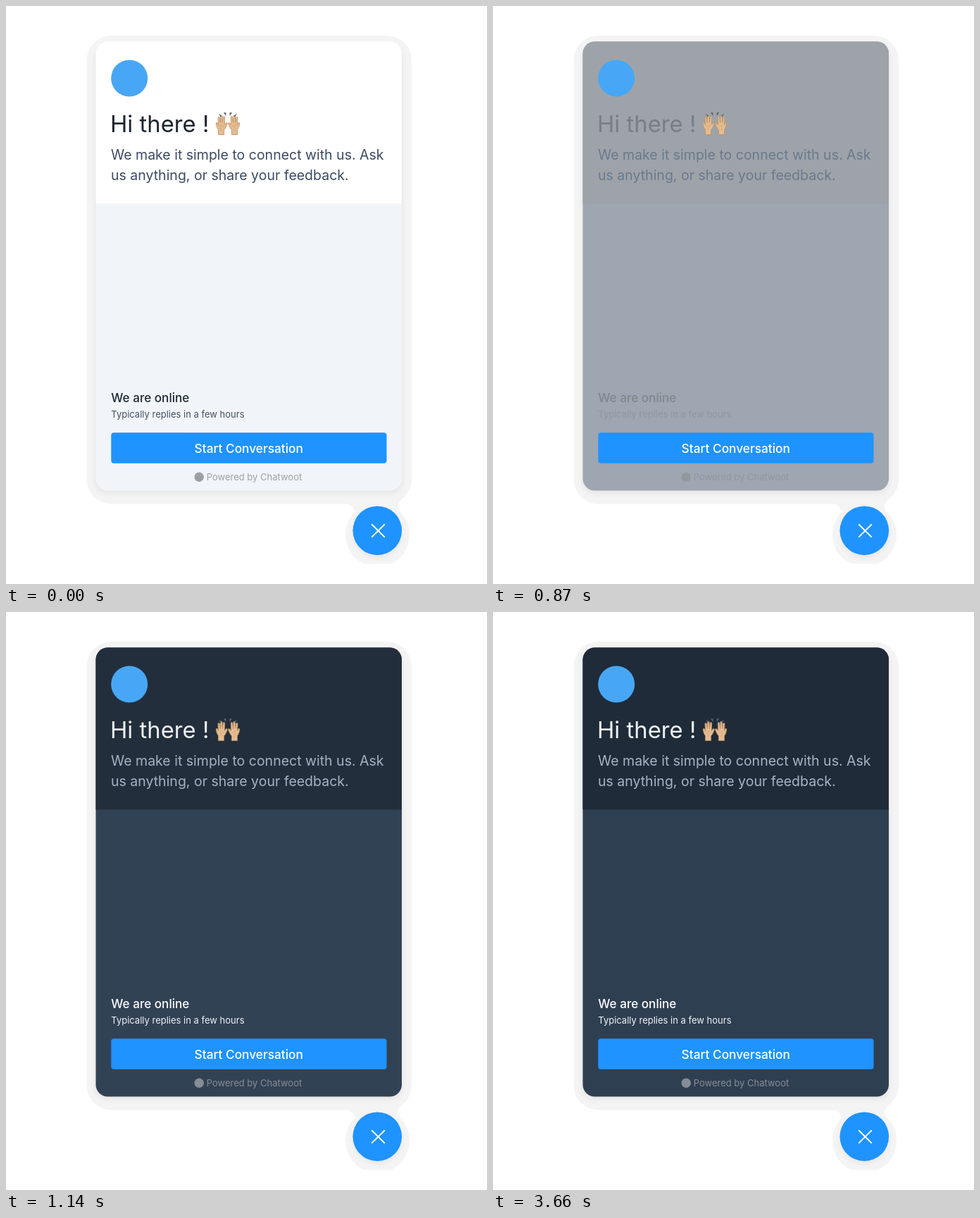
Animation, 683 px wide and 820 px high, one loop 4230 ms. Source, as an HTML page:

```html
<!DOCTYPE html>
<html lang="en">
<head>
<meta charset="utf-8">
<title>Chat widget theme switch</title>
<style>
  html, body { margin: 0; width: 100%; height: 100%; overflow: hidden; background: #fff; }
  svg { display: block; width: 683px; height: 820px; }
  text { font-family: Inter, "Open Sans", sans-serif; font-optical-sizing: none; }
</style>
</head>
<body>
<svg viewBox="0 0 683 820" xmlns="http://www.w3.org/2000/svg">
  <defs>
    <clipPath id="cardClip"><rect x="127.5" y="50.5" width="434.5" height="637" rx="17"/></clipPath>
    <clipPath id="haloClip"><rect width="683" height="791.5"/></clipPath>
    <filter id="blur" x="-10%" y="-10%" width="120%" height="120%"><feGaussianBlur stdDeviation="3"/></filter>
    <g id="hand">
      <path d="M301.5 182.5V175.5C299.5 173 298.7 170 298.3 166.8C298.2 165 300.2 164.8 300.7 166.5L301.6 169
        L301 158.8C301 157 303.2 157 303.5 158.8L304.3 165.5L304.6 156.3C304.7 154.6 307 154.6 307.1 156.3L307.4 165.5
        L308.4 157.5C308.7 156 310.7 156.2 310.7 158L310.3 168.5L312.3 166C313.6 164.8 314.8 166 314.2 167.5
        C313 170.5 311.7 173.5 309.6 175.8V182.5Z" fill="#e5bd91" stroke="#b98d62" stroke-width=".8" stroke-linejoin="round"/>
      <path d="M302.5 171C304 169 307 169 309 171.5M305.8 171.5C304.5 174 305 176 306 177.5" fill="none" stroke="#c79b6e" stroke-width=".7"/>
    </g>
  </defs>

  <g fill="#f4f4f4" clip-path="url(#haloClip)">
    <rect x="114.5" y="42" width="461.5" height="664.5" rx="35"/>
    <circle cx="527.5" cy="750" r="45.5"/>
    <path d="M483 706Q493 708 494 716H558Q552 709 562 700Z"/>
  </g>
  <g fill="#e7e7e7" filter="url(#blur)">
    <rect x="126" y="56" width="437.5" height="636" rx="18"/>
    <circle cx="527.5" cy="748" r="35"/>
  </g>

  <g clip-path="url(#cardClip)">
    <rect id="body" x="127" y="50" width="436" height="638"/>
    <rect id="header" x="127" y="50" width="436" height="230.3"/>
  </g>

  <circle cx="175.2" cy="102.5" r="26" fill="#47a7f6"/>
  <text id="title" x="148" y="178.7" font-size="32.8">Hi there !</text>
  <use href="#hand"/>
  <use href="#hand" transform="matrix(-1 0 0 1 630 0)"/>
  <path id="rays" d="M302 152.5L306.5 156L304.5 157ZM309 151L312.5 151.5L312.3 156ZM317.5 151.5L321 151L317.8 156ZM328 152.5L323.5 156L325.5 157Z"/>

  <g id="subtitle" font-size="19.5">
    <text x="149" y="217.6">We make it simple to connect with us. Ask</text>
    <text x="149" y="247">us anything, or share your feedback.</text>
  </g>

  <text id="status" x="149.3" y="562" font-size="17.1" font-weight="500">We are online</text>
  <text id="reply" x="149.3" y="584.2" font-size="13">Typically replies in a few hours</text>

  <rect x="149.3" y="605.3" width="391.2" height="43.5" rx="4" fill="#1f93ff"/>
  <text x="344.7" y="633.5" font-size="17.3" font-weight="500" text-anchor="middle" fill="#fff">Start Conversation</text>

  <g id="credit">
    <circle cx="274.2" cy="668.3" r="6.7"/>
    <text x="284.7" y="673.2" font-size="13">Powered by Chatwoot</text>
  </g>

  <circle cx="527.3" cy="744.2" r="34.8" fill="#1f93ff"/>
  <path d="M519.2 735.2L537.8 753.6M537.8 735.2L519.2 753.6" stroke="#fff" stroke-width="2" fill="none"/>
</svg>
<script>
  const LOOP = 4230, STEP = 30, FADE_START = 747, FADE_LENGTH = 470;

  // Light and dark fill of each themed part.
  const theme = {
    header:   ["#ffffff", "#1f2b39"],
    body:     ["#f1f5fa", "#2f3f52"],
    title:    ["#1d2430", "#f1f4f7"],
    rays:     ["#50545a", "#626a73"],
    subtitle: ["#3a4b62", "#a6b4c6"],
    status:   ["#1f2933", "#ffffff"],
    reply:    ["#465060", "#f2f4f7"],
    credit:   ["#9da1a6", "#878d95"]
  };

  const channels = hex => [1, 3, 5].map(i => parseInt(hex.slice(i, i + 2), 16));
  const parts = Object.entries(theme).map(([id, [light, dark]]) =>
    ({ node: document.getElementById(id), light: channels(light), dark: channels(dark) }));

  const bezier = (a, b, s) => 3 * a * s * (1 - s) ** 2 + 3 * b * s * s * (1 - s) + s ** 3;

  // CSS "ease": cubic-bezier(.25, .1, .25, 1)
  function ease(x) {
    if (x <= 0) return 0;
    if (x >= 1) return 1;
    let low = 0, high = 1;
    for (let i = 0; i < 24; i++) {
      const mid = (low + high) / 2;
      if (bezier(.25, .25, mid) < x) low = mid; else high = mid;
    }
    return bezier(.1, 1, low);
  }

  function render(ms) {
    const time = Math.floor((ms % LOOP) / STEP) * STEP;
    const k = ease((time - FADE_START) / FADE_LENGTH);
    for (const { node, light, dark } of parts) {
      const mix = light.map((c, i) => Math.round(c + (dark[i] - c) * k));
      node.setAttribute("fill", `rgb(${mix})`);
    }
  }

  const start = performance.now();
  function tick() {
    render(performance.now() - start);
    requestAnimationFrame(tick);
  }
  tick();
</script>
</body>
</html>
```
